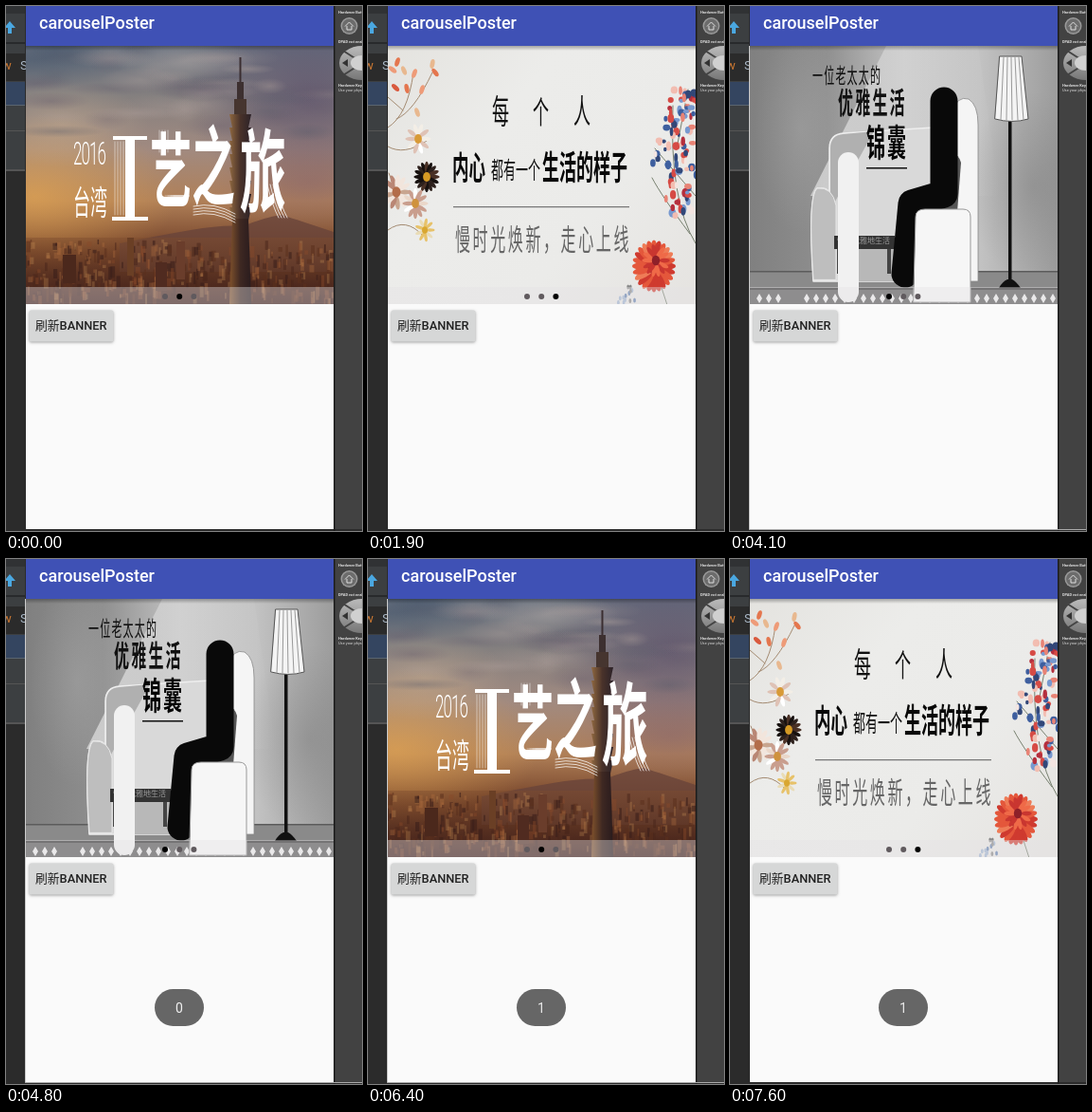
An HTML page with a canvas for the animation above (7700 ms loop, 376x553 px).

```html
<!DOCTYPE html>
<html lang="zh">
<head>
<meta charset="utf-8">
<title>Banner carousel</title>
<style>
  html, body { margin: 0; width: 100%; height: 100%; overflow: hidden; background: #fafafa; }
  canvas { display: block; }
</style>
</head>
<body>
<canvas id="stage" width="376" height="553"></canvas>
<script>
const W = 325, H = 272, LEFT = 21, TOP = 42, LOOP = 7700;
const SANS = 'Roboto, "Noto Sans CJK SC", "Noto Sans CJK JP", sans-serif';
const stage = document.getElementById('stage').getContext('2d');

let seed = 1;
const random = () => (seed = seed * 16807 % 2147483647) / 2147483647;
const between = (a, b) => a + (b - a) * random();
const pick = list => list[Math.floor(random() * list.length)];

function rect(c, x, y, w, h, fill, r = 0) {
  c.fillStyle = fill;
  c.beginPath();
  c.roundRect(x, y, w, h, r);
  c.fill();
}

function oval(c, x, y, rx, ry, fill, turn = 0) {
  c.fillStyle = fill;
  c.beginPath();
  c.ellipse(x, y, rx, ry, turn, 0, 7);
  c.fill();
}

function shape(c, d, fill, stroke, width = 1) {
  const p = new Path2D(d);
  if (fill) { c.fillStyle = fill; c.fill(p); }
  if (stroke) { c.strokeStyle = stroke; c.lineWidth = width; c.stroke(p); }
}

function label(c, text, x, y, font, fill, align = 'left') {
  c.font = font + ' ' + SANS;
  c.fillStyle = fill;
  c.textAlign = align;
  c.textBaseline = 'middle';
  c.fillText(text, x, y);
}

// Banner artwork is wide and gets squeezed into the slot, so its type is tall.
function tall(c, text, x, y, font, fill, spacing = 0) {
  c.save();
  c.translate(x, y);
  c.scale(1, 1.95);
  c.letterSpacing = spacing + 'px';
  label(c, text, 0, 0, font, fill);
  c.restore();
}

function gradient(c, x0, y0, x1, y1, ...colors) {
  const g = c.createLinearGradient(x0, y0, x1, y1);
  colors.forEach((color, i) => g.addColorStop(i / (colors.length - 1), color));
  return g;
}

function glow(c, x, y, rx, ry, rgb, alpha) {
  c.save();
  c.translate(x, y);
  c.scale(rx, ry);
  const g = c.createRadialGradient(0, 0, 0, 0, 0, 1);
  g.addColorStop(0, `rgba(${rgb},${alpha})`);
  g.addColorStop(1, `rgba(${rgb},0)`);
  oval(c, 0, 0, 1, 1, g);
  c.restore();
}

function slide(draw) {
  const canvas = document.createElement('canvas');
  canvas.width = W;
  canvas.height = H;
  const c = canvas.getContext('2d');
  c.translate(-LEFT, -TOP);
  c.lineCap = c.lineJoin = 'round';
  draw(c);
  return canvas;
}

function drawRoom(c) {
  rect(c, LEFT, TOP, W, H, gradient(c, 21, 0, 346, 0, '#808080', '#8f8f8f', '#c4c4c4', '#c2c2c2', '#9c9c9c'));
  shape(c, 'M165 42H262L285 200H85Z', gradient(c, 110, 0, 285, 0, 'rgba(225,225,225,.75)', 'rgba(225,225,225,0)'));
  glow(c, 320, 190, 70, 100, '110,110,110', .35);
  glow(c, 75, 130, 50, 110, '185,185,185', .3);
  rect(c, 21, 280, W, 17, '#8a8a8a');
  rect(c, 21, 279, W, 1.5, '#5c5c5c');

  shape(c, 'M105 205V150Q105 135 120 134L215 128H240V290H88Q82 200 92 192Q108 190 110 208V250Z', '#d9d9d9', '#eee', 1.5);
  shape(c, 'M106 205V150Q106 136 120 135L152 132L106 215Z', '#b0b0b0');
  shape(c, 'M88 288Q82 200 92 192Q108 190 112 210V288Z', '#bebebe', '#e8e8e8');
  shape(c, 'M234 112Q240 94 252 98Q262 104 262 125V290H225V150Z', '#f5f5f5', '#888', .8);
  shape(c, 'M224 160Q240 150 244 165L240 217H222Z', '#555');
  rect(c, 115, 254, 70, 36, '#b8b8b8');
  rect(c, 110, 242, 64, 14, '#333');
  rect(c, 113, 256, 4, 26, '#444');
  rect(c, 166, 256, 4, 26, '#444');
  label(c, '慢慢优雅地生活', 113, 248, '8px', '#999');

  rect(c, 21, 297, W, 17, '#555');
  rect(c, 21, 297, W, 2, '#2c2c2c');
  for (let x = 28; x < 346; x += 10) {
    if (x > 55 && x < 70) continue;
    shape(c, `M${x} 308l3 -5l3 5l-3 5z`, '#eee');
  }

  shape(c, 'M226 100V198L192 208L185 282', null, '#090909', 29);
  shape(c, 'M196 222Q196 214 206 214H246Q254 214 254 222V312H194Z', '#f6f6f6', '#999');
  rect(c, 114, 154, 22, 158, '#f1f1f1', 11);

  rect(c, 294, 118, 3.5, 174, '#111');
  shape(c, 'M284 297Q288 290 293 288H298Q302 290 307 297Z', '#111');
  shape(c, 'M285 53H308L315 119Q298 124 280 119Z', '#f4f4f4', '#555');
  for (let i = 1; i < 6; i++) shape(c, `M${285 + i * 4} 54L${280 + i * 6} 120`, null, '#999');

  tall(c, '一位老太太的', 87, 75, '11px', '#111', 1.2);
  tall(c, '优雅生活', 114, 104, '700 16px', '#111', 2.2);
  tall(c, '锦囊', 144, 147, '900 20px', '#050505', 2);
  rect(c, 144, 170, 43, 1.5, '#111');
}

function drawCity(c) {
  rect(c, LEFT, TOP, W, H, gradient(c, 0, 42, 0, 314, '#66707f', '#85807f', '#a18a80', '#b08058', '#6e3c24', '#3e2018'));
  glow(c, 30, 200, 150, 85, '226,165,82', .7);
  glow(c, 60, 125, 90, 45, '205,178,148', .45);
  glow(c, 320, 95, 130, 110, '92,80,108', .7);
  glow(c, 320, 185, 110, 55, '143,104,104', .6);
  glow(c, 30, 48, 110, 40, '68,86,108', .7);
  seed = 23;
  for (let i = 0; i < 45; i++)
    glow(c, between(21, 346), between(45, 135), between(18, 55), between(5, 14),
      pick(['200,182,168', '180,164,160', '84,88,104', '96,86,104']), between(.12, .35));
  glow(c, 190, 58, 75, 22, '195,182,175', .45);

  shape(c, 'M120 250Q160 242 195 236T250 232Q275 222 291 220Q310 226 346 238V280H120Z', 'rgba(105,68,58,.8)');
  rect(c, 21, 244, W, 70, gradient(c, 0, 244, 0, 314, 'rgba(125,76,46,.45)', 'rgba(60,28,24,.9)'));
  seed = 11;
  for (let i = 0; i < 420; i++) {
    const y = between(246, 308);
    rect(c, between(19, 344), y, between(1.5, 5), between(3, 14),
      pick(['#4a271c88', '#5b2f1d88', '#3b1f1a99', '#8b4a2a66', '#b0703f55', '#d29a5a44']));
  }
  rect(c, 180, 248, 9, 40, '#6a3d2b');
  rect(c, 128, 244, 7, 40, '#6a3f25');
  rect(c, 60, 262, 14, 30, '#4b281c');
  rect(c, 158, 270, 12, 30, '#502b20');

  rect(c, 246.5, 54, 2, 30, '#3a2e31');
  rect(c, 244, 80, 7, 20, '#3d3030');
  rect(c, 241, 98, 13, 18, '#46352f');
  const facade = gradient(c, 236, 0, 259, 0, '#8f6840', '#49322a', '#2c2228');
  for (let y = 114; y < 224; y += 14) shape(c, `M236 ${y}H259L256 ${y + 14}H239Z`, facade);
  shape(c, 'M239 224H256L259 314H236Z', gradient(c, 236, 0, 259, 0, '#80522c', '#3e2822', '#291b1d'));

  tall(c, '2016', 71, 157, '300 17px', '#fff', -.9);
  tall(c, '台湾', 71, 210, '300 18px', '#fff');
  shape(c, 'M113 137H149V141H136V222H150V226H112V222H126V141H113Z', '#fff');
  for (let i = 0; i < 4; i++) {
    const d = i * 3;
    shape(c, `M${115 + d} 143V220M${162 + d} 131V154M${168 + d} 200H193`, null, 'rgba(255,255,255,.6)', .8);
    shape(c, `M198 ${211 + d}Q220 ${206 + d} 242 ${219 + d}M${276 + d} 188Q${281 + d} 210 ${288 + d} 223`, null, 'rgba(255,255,255,.75)', 1);
  }
  tall(c, '艺', 152, 181, '700 44px', '#fff');
  tall(c, '之', 196, 176, '700 46px', '#fff');
  tall(c, '旅', 247, 182, '700 49px', '#fff');
}

function petals(c, x, y, r, count, colors, center) {
  for (let i = 0; i < count; i++) {
    const a = i / count * Math.PI * 2;
    oval(c, x + Math.cos(a) * r * .55, y + Math.sin(a) * r * .75, r * .5, r * .17, pick(colors), a);
  }
  oval(c, x, y, r * .3, r * .38, center);
}

function drawFlowers(c) {
  rect(c, LEFT, TOP, W, H, gradient(c, 21, 42, 346, 314, '#e4e3df', '#ececea', '#ebebe9', '#e5e3e0'));
  seed = 5;
  shape(c, 'M21 128Q42 115 48 70M30 119Q48 112 68 70M21 96L37 110M21 148Q38 158 62 142M21 236Q40 222 58 242M22 176L34 206', null, '#a48b72', 1);
  for (const [x, y] of [[31, 59], [38, 68], [29, 86], [41, 87], [49, 71], [68, 61], [71, 70], [57, 88], [26, 67], [52, 112]])
    oval(c, x, y, 2.4, 5, pick(['#e4764e', '#ee9b78', '#d9593d', '#e8b88f']), between(-1, 1));
  petals(c, 53, 140, 13, 10, ['#f3eee6', '#dfc2b5', '#fff'], '#d89a37');
  petals(c, 62, 180, 13, 16, ['#2d211d', '#493025', '#17110f'], '#d69a24');
  petals(c, 30, 196, 15, 13, ['#c8a58f', '#f2e5dc', '#b98674'], '#b36d4a');
  petals(c, 50, 208, 13, 12, ['#ead7c9', '#c99e8e', '#fff'], '#cf923d');
  petals(c, 60, 236, 10, 9, ['#e9dcb6', '#e7c26a'], '#d9a730');

  shape(c, 'M346 250Q318 205 322 105M346 200Q320 170 303 150M340 240Q310 200 300 181M327 145L338 88M316 315L303 275', null, '#77806f', 1);
  for (let i = 0; i < 105; i++) {
    const y = between(88, 222), spread = 31 - Math.abs(y - 158) * .25;
    oval(c, between(343 - spread * 1.45, 348), y, between(1.5, 4), between(2, 5),
      pick(['#3e5f9f', '#7899cf', '#d64b45', '#e88375', '#f2bdb1', '#b52f3d', '#324778', '#f3e5e1']));
  }
  petals(c, 302, 274, 22, 24, ['#e4573b', '#cf3a2f', '#ee7c57'], '#b02c2c');
  petals(c, 304, 268, 14, 14, ['#ef6a48', '#c93630'], '#8e2029');
  for (let i = 0; i < 13; i++) oval(c, between(262, 283), between(294, 313), 1.4, 2.5, pick(['#617ead', '#9fb3d0', '#888']));

  tall(c, '每', 131, 114, '500 18px', '#111');
  tall(c, '个', 174, 114, '500 17px', '#111');
  tall(c, '人', 217, 114, '500 18px', '#111');
  tall(c, '内心', 89, 173, '700 17.5px', '#080808');
  tall(c, '都有一个', 130, 175, '500 13px', '#111');
  tall(c, '生活的样子', 184, 173, '700 18px', '#080808');
  rect(c, 90, 211, 186, 1.2, '#777');
  tall(c, '慢时光焕新，走心上线', 92, 248, '300 16px', '#666', 2.6);
}

const slides = [drawRoom, drawCity, drawFlowers].map(slide);

function drawDesktop(c) {
  rect(c, 0, 0, 376, 553, '#2b2b2b');
  rect(c, 0, 0, 20, 174, '#3c3f41');
  rect(c, 0, 0, 20, 8, '#303234');
  rect(c, 0, 38, 20, 2, '#282a2c');
  shape(c, 'M4 16L10 23H6V29H2V23H-2Z', '#4aa7e0');
  rect(c, 0, 50, 20, 29, '#2b2b2b');
  label(c, 'w', -4, 63, '13px', '#cc7832');
  label(c, 'S', 15, 63, '13px', '#a9b7c6');
  rect(c, 0, 80, 20, 24, '#344560');
  rect(c, 0, 104, 20, 1, '#5a6570');
  rect(c, 0, 131, 20, 1, '#555');
  rect(c, 0, 172, 20, 2, '#555');

  rect(c, 346, 0, 30, 551, '#424242');
  rect(c, 346, 0, 1.5, 553, '#1c1c1c');
  label(c, 'Hardware Buttons', 351, 7, '700 4px', '#ddd');
  label(c, 'DPAD not enabled', 351, 38, '700 4px', '#ddd');
  label(c, 'Hardware Keyboard', 351, 84, '700 4px', '#ddd');
  label(c, 'Use your physical', 351, 89, '4px', '#ddd');
  oval(c, 362.5, 21, 9, 9, '#9a9a9a');
  oval(c, 362.5, 21, 7.5, 7.5, '#6c6c6c');
  shape(c, 'M358 21.5L362.5 17L367 21.5M360 21V25H365V21', null, '#ddd', 1);
  oval(c, 376, 60, 24, 18, gradient(c, 0, 42, 0, 78, '#bbb', '#777'));
  shape(c, 'M356 47L370 56M356 73L370 64', null, '#444', 2);
  oval(c, 376, 60, 12, 8, '#d0d0d0');
  shape(c, 'M355 60L361 56V64Z', '#333');
}

function drawButton(c) {
  c.save();
  c.shadowColor = 'rgba(0,0,0,.35)';
  c.shadowBlur = 3;
  c.shadowOffsetY = 1;
  rect(c, 24.5, 320.5, 89, 33, '#d6d7d7', 2);
  c.restore();
  label(c, '刷新BANNER', 31, 337.5, '500 12.8px', '#222');
}

function drawToast(c, t) {
  if (t < 4300) return;
  c.globalAlpha = t < 4800 ? Math.min(.96, (t - 4200) / 400) : 1;
  rect(c, 157, 453, 52, 39, '#666', 19.5);
  const next = Math.min(1, Math.max(0, (t - 5900) / 500));
  const digit = (text, alpha) => label(c, text, 183, 473.5, '14px', `rgba(255,255,255,${alpha})`, 'center');
  if (next < 1) digit('0', .9 * (1 - next));
  if (next > 0) digit('1', .85 * next);
  c.globalAlpha = 1;
}

// Each turn starts a decelerating scroll to the next page.
const TURNS = [1676, 3501, 5301, 7176], SCROLL = 230;

function drawBanner(c, t) {
  const turns = TURNS.filter(start => t >= start);
  const page = (1 + turns.length) % 3;
  const x = turns.length ? Math.min(1, (t - turns.at(-1)) / SCROLL) : 1;
  const shift = Math.round(W * (1 - x) ** 5);

  c.save();
  c.beginPath();
  c.rect(LEFT, TOP, W, H);
  c.clip();
  if (shift) c.drawImage(slides[(page + 2) % 3], LEFT + shift - W, TOP);
  c.drawImage(slides[page], LEFT + shift, TOP);
  rect(c, LEFT, 296, W, 18, 'rgba(228,224,228,.4)');
  for (let i = 0; i < 3; i++) oval(c, 168 + i * 15.2, 306, 3, 3, i === page ? '#000' : '#605a5e');
  c.restore();
}

function draw(t) {
  const c = stage;
  drawDesktop(c);
  rect(c, 21, 0, 325, 551, '#fafafa');
  drawBanner(c, t);
  rect(c, 21, 0, 325, 42, '#3f51b5');
  rect(c, 21, 42, 325, 5, gradient(c, 0, 42, 0, 47, 'rgba(0,0,0,.3)', 'rgba(0,0,0,0)'));
  label(c, 'carouselPoster', 35, 19, '500 18px', '#fff');
  drawButton(c);
  drawToast(c, t);
  // The window shows a light edge while it has focus.
  if (t >= 4100 && t < 7600) {
    rect(c, 20, 42, 1, 510, '#ccc');
    rect(c, 20, 551, 356, 1, '#aaa');
  }
}

const begin = performance.now();
function tick() {
  const t = (performance.now() - begin) % LOOP;
  draw(Math.floor(t / 100) * 100);
  requestAnimationFrame(tick);
}
tick();
</script>
</body>
</html>
```
